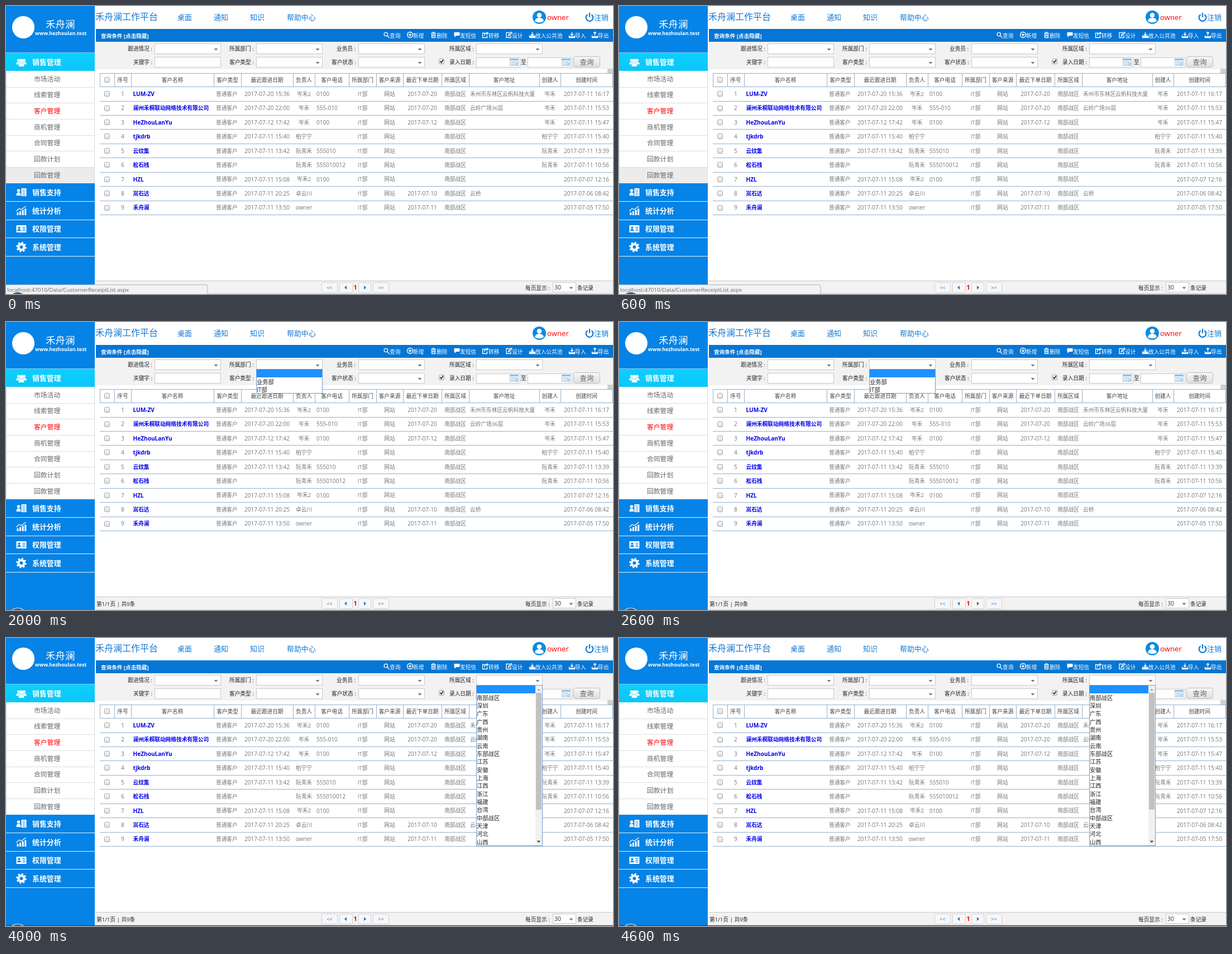
Recreate the animation shown at these times as an HTML page. Size 1087 by 515 pixels, loop 5 s.

```html
<!DOCTYPE html>
<html lang="zh-CN">
<head>
<meta charset="utf-8">
<title>客户管理</title>
<style>
  html, body { margin: 0; width: 100%; height: 100%; overflow: hidden; background: #fff; }
  svg { display: block; font-family: "Open Sans", "Noto Sans CJK SC", "Noto Sans CJK", sans-serif; }
  text { white-space: pre; }
  .icon { fill: none; stroke: #fff; stroke-width: 1.3; }
  .solid { fill: #fff; }
</style>
</head>
<body>
<svg id="stage" width="1087" height="515" viewBox="0 0 1087 515">
  <defs>
    <linearGradient id="button" x2="0" y2="1"><stop stop-color="#f8f8f8"/><stop offset="1" stop-color="#dedede"/></linearGradient>
    <linearGradient id="active" x2="0" y2="1"><stop stop-color="#0bd0fb"/><stop offset="1" stop-color="#0cc6fa"/></linearGradient>
  </defs>
  <g id="page"></g>
  <g id="overlay"></g>
</svg>
<script>
const BLUE = '#0583e6', LINK = '#1279d3', GRID = '#93b1cd';
const ROW = 25.43, LIST_TOP = 85;

const escapeText = s => String(s).replace(/&/g, '&amp;').replace(/</g, '&lt;');
const hasHan = s => /[\u4e00-\u9fff]/.test(s);

// Text is placed by its left, middle or right x and its vertical centre.
function text(x, cy, s, { size = hasHan(s) ? 9.7 : 10.1, fill = '#333', anchor = 'start', bold = false } = {}) {
  return `<text x="${x}" y="${(cy + size * 0.37).toFixed(2)}" font-size="${size}" fill="${fill}" ` +
    `text-anchor="${anchor}" font-weight="${bold ? 700 : 400}">${escapeText(s)}</text>`;
}
const rect = (x, y, w, h, fill, more = '') =>
  `<rect x="${x}" y="${y}" width="${w}" height="${h}" fill="${fill}" ${more}/>`;
const box = (x, y, w, h, fill, stroke, r = 0) =>
  rect(x + 0.5, y + 0.5, w - 1, h - 1, fill, `stroke="${stroke}" rx="${r}"`);
const circle = (x, y, r, fill, more = '') => `<circle cx="${x}" cy="${y}" r="${r}" fill="${fill}" ${more}/>`;
const path = (d, more = '') => `<path d="${d}" ${more}/>`;
const at = (x, y, body) => `<g transform="translate(${x} ${y})">${body}</g>`;
const arrow = (x, y, fill = '#777') => path(`M${x - 3.5} ${y - 1.5}h7l-3.5 3.8z`, `fill="${fill}"`);
const checkbox = (x, cy) => box(x - 5, cy - 5, 10, 10, 'url(#button)', '#a3a3a3', 2);

function select(x, y, w = 119, h = 19) {
  return box(x, y, w, h, '#fff', '#c9c9c9') + arrow(x + w - 9, y + h / 2 + 1);
}
function dateField(x, w) {
  const cx = x + w - 19;
  return box(x, 92, w, 18, '#fff', '#c9c9c9') +
    box(cx, 94, 16, 13, '#e7f1fa', '#a9cbe6') + rect(cx, 94, 16, 3, '#8dbfe5') +
    [3, 6, 9].map(d => rect(cx + d, 99, 2, 2, '#a9cbe6') + rect(cx + d, 103, 2, 2, '#a9cbe6')).join('') +
    circle(cx + 12.5, 103.5, 3, '#b9d6ee');
}

function sidebar() {
  const people = [[-5, -3, 2.6], [5, -3, 2.6], [0, -2, 3.4]].map(([x, y, r]) =>
    circle(x, y, r, '#fff') + path(`M${x - r - 2} ${y + r * 3}q0-${r * 2} ${r + 2}-${r * 2}t${r + 2} ${r * 2}z`,
      'fill="#fff" stroke="#0bcbfb" stroke-width=".6"')).join('');
  const card = rect(-9, -6, 18, 13, '#fff', 'rx="1"') + circle(-4, -1.5, 2, BLUE) +
    path('M-7.5 4q0-3 3.5-3t3.5 3zM2-3h5v1.3h-5zM2 0h5v1.3h-5zM2 3h5v1.3h-5z', `fill="${BLUE}"`);
  const support = circle(-5, -3, 2.8, '#fff') + path('M-9 6q0-6 4-6t4 6z', 'fill="#fff"') +
    rect(0, -7, 9, 14, '#fff') + path('M2-4h5M2-1h5M2 2h5M2 5h5', `stroke="${BLUE}" stroke-width="1.2"`);
  const chart = [0, 1, 2, 3].map(i => rect(-8 + i * 4.6, 3 - i * 2.2, 3, 5 + i * 2.2, '#fff')).join('') +
    path('M-9 1l5-5 4 2 8-6', 'class="icon"');
  const gear = circle(0, 0, 5, 'none', 'stroke="#fff" stroke-width="4"') +
    circle(0, 0, 7.8, 'none', 'stroke="#fff" stroke-width="3" stroke-dasharray="3.1 3.03"');

  let out = rect(0, 0, 159, 520, BLUE) + circle(31, 38, 20, '#fff') +
    text(71, 33, '禾舟澜', { size: 17.5, fill: '#fff' }) +
    text(52, 49, 'www.hezhoulan.test', { size: 9, fill: '#fff', bold: true }) +
    rect(0, 83, 159, 1, '#8cc8f5') + rect(0, 84, 159, 32, 'url(#active)') +
    rect(0, 116, 159, 201, '#fff');
  ['市场活动', '线索管理', '客户管理', '商机管理', '合同管理', '回款计划', '回款管理'].forEach((name, i) => {
    const y = 116 + i * 28.65;
    if (i === 6) out += rect(1, 288, 158, 29, '#ececec', 'id="hovered"');
    if (i) out += rect(0, Math.round(y), 159, 1, '#dedede');
    out += text(50, y + 14.3, name, { size: 11.8, fill: i === 2 ? '#f00' : '#666' });
  });
  out += rect(0, 116, 1, 201, '#d5dde3') + rect(158, 116, 1, 201, '#d5dde3');
  const groups = [['销售管理', 100, people], ['销售支持', 333, support], ['统计分析', 366, chart],
    ['权限管理', 398, card], ['系统管理', 431, gear]];
  for (const [name, y, icon] of groups) {
    out += at(27.5, y, icon) + text(47, y, name, { size: 12.9, fill: '#fff', bold: true });
    if (y > 100) out += rect(0, y + 16, 159, 1, '#e4f2fd');
  }
  return out;
}

function header() {
  let out = text(160, 19, '禾舟澜工作平台', { size: 16, fill: LINK });
  [[307, '桌面'], [372, '通知'], [437, '知识'], [503, '帮助中心']].forEach(([x, s]) => {
    out += text(x, 20, s, { size: 12.9, fill: LINK });
  });
  return out + circle(955, 20, 12, '#0a8be0') + circle(955, 16.5, 4.3, '#fff') +
    path('M947 27q1-6 8-6t8 6q-8 5-16 0z', 'fill="#fff"') +
    text(969, 20, 'owner', { size: 13.2, fill: '#f00' }) +
    path('M1041.5 15.5a6.3 6.3 0 1 0 7 0M1045 12v8', `fill="none" stroke="${LINK}" stroke-width="2.2"`) +
    text(1053, 20, '注销', { size: 13, fill: LINK });
}

function toolbar() {
  const tray = 'M-5 1v4h10v-4M-5 3.5h10';
  const tools = [
    [687, '查询', 'M2-1a3.2 3.2 0 1 1-6.4 0a3.2 3.2 0 1 1 6.4 0M1 1.5l4 4'],
    [729, '新增', 'M5 0a5 5 0 1 1-10 0a5 5 0 1 1 10 0M-3 0h6M0-3v6'],
    [771, '删除', 'M-4-3h8M-1.5-4.5h3M-3-3v8h6v-8M-1-1v4M1-1v4'],
    [813, '发短信', 'M-5-4.5h10v6h-6l-3 3v-3h-1z', 'solid'],
    [864, '转移', 'M0-3h-5v8h8v-4M-2 2q0-5 6-5M2-5l3 2-3 2.5'],
    [906, '设计', 'M1-4h-5.5v9h8v-4M-1 2l1-3 4-4 1.5 1.5-4 4z'],
    [948, '放入公共池', tray + 'M0-5v6M-2.5-1.5l2.5 2.5 2.5-2.5M-4 1.8h8'],
    [1019, '导入', tray + 'M0-5v6M-2.5-1.5l2.5 2.5 2.5-2.5'],
    [1060, '导出', tray + 'M0 2v-7M-2.5-2.5l2.5-2.5 2.5 2.5']
  ];
  return rect(161, 41, 926, 23, '#0676d4') +
    text(170, 53, '查询条件 [点击隐藏]', { size: 9.6, fill: '#fff', bold: true }) +
    tools.map(([x, s, d, style = 'icon']) => at(x - 5.5, 51.5, path(d, `class="${style}"`)) +
      text(x, 53.5, s, { fill: '#fff' })).join('');
}

function filters() {
  const labels = [[218, 76.5, '跟进情况 :'], [400, 76.5, '所属部门 :'], [592, 76.5, '业务员 :'], [794, 76.5, '所属区域 :'],
    [228, 100.5, '关键字 :'], [400, 100.5, '客户类型 :'], [583, 100.5, '客户状态 :'], [794, 100.5, '录入日期 :'],
    [922, 100.5, '至']];
  return rect(161, 64, 926, 49, '#f2f2f2') +
    labels.map(([x, y, s]) => text(x, y, s, { fill: '#222' })).join('') +
    [266, 448, 631, 842].map(x => select(x, 67)).join('') +
    box(266, 91, 119, 19, '#fff', '#c9c9c9') + select(448, 91) + select(631, 91) +
    checkbox(780, 99) + path('M777.5 98.5l2 2.5 3.5-5', 'fill="none" stroke="#333" stroke-width="1.7"') +
    dateField(842, 79) + dateField(934, 80) +
    box(1016, 90, 48, 20, 'url(#button)', '#bdbdbd', 3) +
    text(1040, 100, '查询', { size: 12.5, fill: '#666', anchor: 'middle' }) +
    rect(1077, 112, 10, 8, '#cfcfcf');
}

function table() {
  const edges = [168, 194, 224, 372, 421, 514, 553, 614, 663, 711, 780, 829, 955, 993, 1086];
  const titles = ['', '序号', '客户名称', '客户类型', '最近跟进日期', '负责人', '客户电话', '所属部门', '客户来源',
    '最近下单日期', '所属区域', '客户地址', '创建人', '创建时间'];
  const leftAligned = { 2: 227.5, 3: 376, 6: 556, 11: 831 };
  // name, followed up, owner, phone, ordered, address, creator, created
  const customers = [
    ['LUM-ZV', '07-20 15:36', '岑禾2', '0100', '07-20', '禾州市东林区云帆科技大厦', '岑禾', '11 16:17'],
    ['澜州禾桐联动网络技术有限公司', '07-20 22:00', '岑禾', '555-010', '07-20', '云岭广场36层', '岑禾', '11 15:53'],
    ['HeZhouLanYu', '07-12 17:42', '岑禾', '0100', '07-12', '', '岑禾', '11 15:47'],
    ['tjkdrb', '07-11 15:40', '柏宁宁', '', '', '', '柏宁宁', '11 15:40'],
    ['云纹集', '07-11 13:42', '阮青禾', '555010', '', '', '阮青禾', '11 13:39'],
    ['松石栈', '', '阮青禾', '555010012', '', '', '阮青禾', '11 10:56'],
    ['HZL', '07-11 15:08', '岑禾2', '0100', '', '', '', '07 12:16'],
    ['岚石达', '07-11 20:25', '卓云川', '', '07-10', '云桥', '', '06 08:42'],
    ['禾舟澜', '07-11 13:50', 'owner', '', '07-11', '', '', '05 17:50']
  ];
  const dated = s => s && '2017-' + s;
  const middle = c => (edges[c] + edges[c + 1]) / 2;

  let out = rect(168, 120, 919, 1, GRID) + rect(168, 144, 919, 1, GRID) + checkbox(181, 132);
  edges.forEach(x => out += rect(x, 120, 1, 25, GRID));
  titles.forEach((s, c) => out += text(middle(c), 132.5, s, { fill: '#444', anchor: 'middle' }));
  customers.forEach(([name, followed, owner, phone, ordered, address, creator, created], i) => {
    const cy = 157.2 + i * ROW;
    const cells = ['', i + 1, name, '普通客户', dated(followed), owner, phone, 'IT部', '网站',
      dated(ordered), '南部战区', address, creator, dated('07-' + created)];
    out += checkbox(181, Math.round(cy)) + rect(168, Math.round(144.2 + (i + 1) * ROW), 919, 1, GRID);
    cells.forEach((s, c) => {
      if (s === '') return;
      const x = leftAligned[c];
      out += text(x || middle(c), cy, s, {
        fill: c === 2 ? '#00e' : '#777', bold: c === 2, anchor: x ? 'start' : 'middle'
      });
    });
  });
  return out;
}

function pager() {
  const button = (x, w, body) => box(x, 494, w, 19, '#f7f7f7', '#d3d3d3', 2) + body;
  const label = (x, s) => text(x, 504, s, { size: 9, fill: LINK, anchor: 'middle' });
  return rect(161, 491, 926, 30, '#f2f2f2') + rect(161, 491, 926, 1, '#c6c6c6') + rect(161, 514, 926, 1, '#d0d0d0') +
    text(162, 504, '第1/1页 | 共9条', { size: 9.7, fill: '#222' }) +
    button(565, 29, label(579.5, '<<')) + button(657, 29, label(671.5, '>>')) +
    button(597, 24, path('M610 500v7l-4-3.5z', `fill="${LINK}"`)) +
    button(631, 23, path('M641 500v7l4-3.5z', `fill="${LINK}"`)) +
    text(625.5, 503.5, '1', { size: 10.5, fill: '#e00', bold: true, anchor: 'middle' }) +
    text(930, 504, '每页显示 :', { fill: '#222' }) + select(979, 494, 42, 18) +
    text(982, 503.5, '30', { size: 10.5 }) + text(1023, 504, '条记录', { fill: '#222' });
}

function dropList(x, items, scrolls) {
  let y = LIST_TOP + 14, rows = '';
  for (const item of items) {
    const han = hasHan(item), height = han ? 14.33 : 13.2;
    rows += text(x + 1, y + height / 2 + (han ? 0.6 : 0), item, { size: han ? 10.3 : 9.7, fill: '#222' });
    y += height;
  }
  const bottom = Math.round(y + 0.7);
  const scrollbar = rect(x + 106, LIST_TOP, 12, bottom - LIST_TOP - 1, '#f1f1f1') +
    rect(x + 107, 98, 10, 209, '#c1c1c1') +
    path(`M${x + 109} 94h6l-3-3.5z`, 'fill="#a3a3a3"') + arrow(x + 112, 364, '#505050');
  return box(x, LIST_TOP - 1, 119, bottom - LIST_TOP + 1, '#fff', '#6f9bd1') +
    rect(x + 1, LIST_TOP, scrolls ? 105 : 117, 14, '#1e90ff') + rows + (scrolls ? scrollbar : '');
}

const statusBar = path('M-1 498.5H358q3 0 3 3V516H-1z', 'fill="#f2f2f2" stroke="#b5b5b5"') +
  text(2, 507, 'localhost:47010/Data/CustomerReceiptList.aspx', { size: 9.8, fill: '#666' });

const overlays = [
  statusBar,
  dropList(266, [7, 15, 30, 60, 90, 180, 360].map(days => days + '天未跟进')),
  dropList(448, ['业务部', 'IT部']),
  dropList(631, ['owner', 'marketing', '闻巧岚', '岑禾', '岑禾2', '穆筝', '阮青禾', '纪澄', '纪晚晴', '沐川',
    '沐远山', '祁望舟', '祝禾', '柏宁宁', '虞承墨', '简 澄', '简素梅', '卓云川']),
  dropList(842, ['南部战区', '深圳', '广东', '广西', '贵州', '湖南', '云南', '东部战区', '江苏', '安徽', '上海',
    '江西', '浙江', '福建', '台湾', '中部战区', '天津', '河北', '山西'], true) + rect(0, 514, 1087, 1, '#26394d')
];
const orb = circle(21, 528, 16.5, '#1b5f9e', 'stroke="#d9e6f0" stroke-width="1.2"');

const page = document.getElementById('page');
const overlay = document.getElementById('overlay');
page.innerHTML = header() + toolbar() + filters() + table() + pager() + sidebar();
const hovered = document.getElementById('hovered');

let shown = -1;
function draw() {
  const step = Math.floor(performance.now() / 1000) % overlays.length;
  if (step !== shown) {
    shown = step;
    overlay.innerHTML = overlays[step] + orb;
    hovered.style.display = step === 0 ? '' : 'none';
    page.setAttribute('transform', `translate(0 ${step === 4 ? -1 : 0})`);
  }
  requestAnimationFrame(draw);
}
draw();
</script>
</body>
</html>
```
